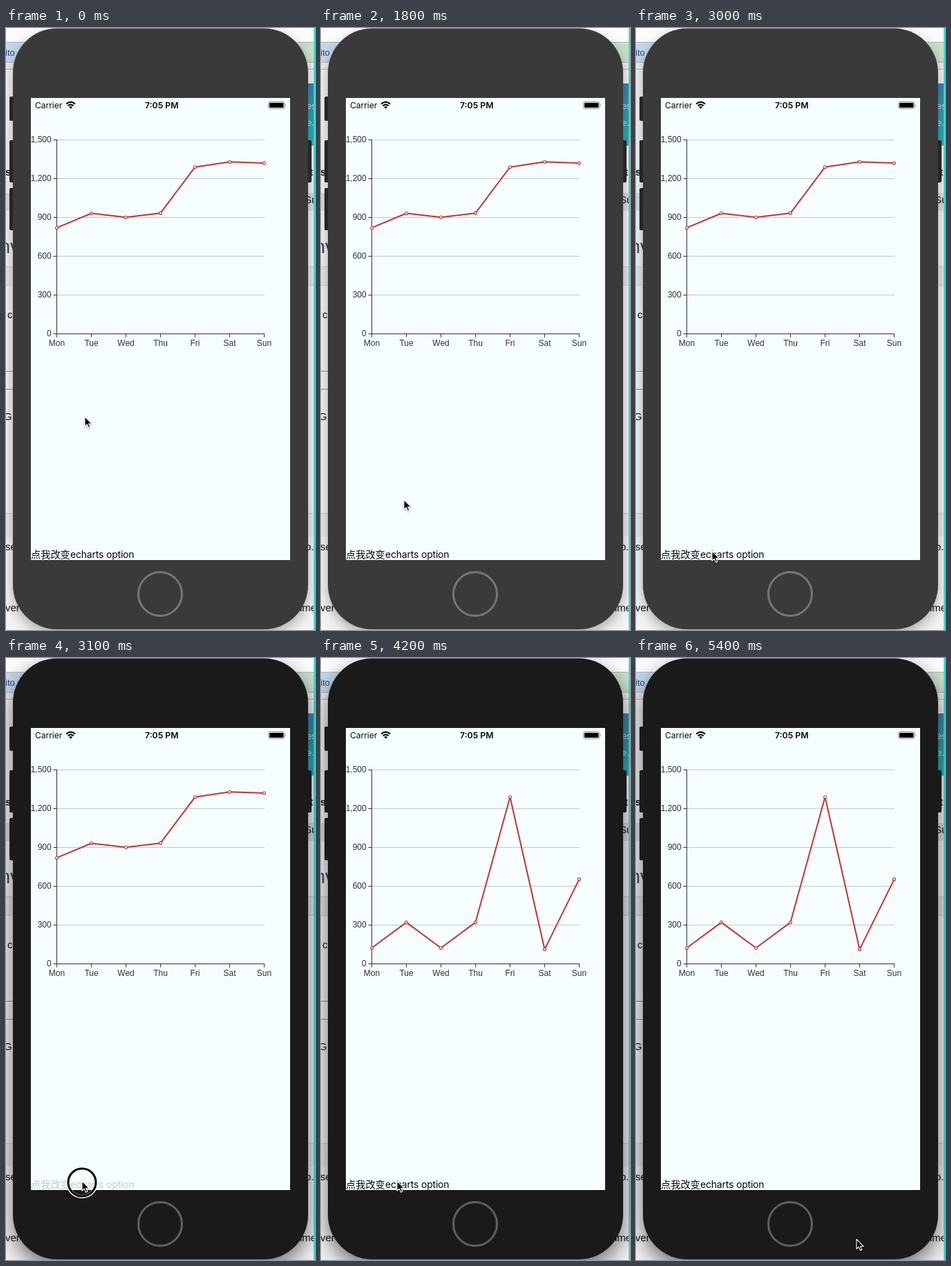
An HTML page for the animation above (5.5 s loop, 447 by 869 pixels).

```html
<!DOCTYPE html>
<html lang="zh">
<head>
<meta charset="utf-8">
<title>Chart option demo</title>
<style>
  html, body { margin: 0; width: 100%; height: 100%; overflow: hidden; background: #eee; }
  svg { display: block; width: 447px; height: 869px; }
  .page { font: 15px "Liberation Sans", Arial, sans-serif; fill: #111; }
  .ui { font: 12px Inter, "Open Sans", sans-serif; fill: #0a0a0a; }
  .axis { font: 12px "Liberation Sans", Arial, sans-serif; fill: #333; }
  #body { fill: #3a3a3a; filter: drop-shadow(0 7px 9px rgba(0, 0, 0, .3)); }
  #home { fill: none; stroke: #777; stroke-width: 3; }
  .keys { fill: #2c2c2c; }
  .focus #body { fill: #1a1a1a; filter: drop-shadow(0 12px 15px rgba(0, 0, 0, .55)); }
  .focus #home { stroke: #606060; }
  .focus .keys { fill: #242424; }
</style>
</head>
<body>
<svg id="stage" viewBox="0 0 447 869">
  <!-- desktop behind the phone -->
  <g class="page">
    <rect width="447" height="869" fill="#f3f3f3"/>
    <rect width="447" height="20" fill="#fcfcfc"/>
    <rect y="20" width="220" height="30" fill="#c3d8ee"/>
    <rect x="220" y="20" width="227" height="30" fill="#c9dfca"/>
    <rect y="50" width="447" height="10" fill="#ededed"/>
    <path d="M0 20.5H447M0 49.5H447M0 59.5H447" stroke="#b4b4b4"/>
    <rect y="238" width="447" height="26" fill="#dcdcdc"/>
    <rect y="344" width="447" height="28" fill="#e6e6e6"/>
    <rect y="700" width="447" height="34" fill="#e9e9e9"/>
    <path d="M0 344.5H447M0 371.5H447M0 700.5H447" stroke="#cfcfcf"/>
    <path d="M0 495.5H20M0 521.5H20" stroke="#8a8a8a"/>
    <linearGradient id="teal" x2="0" y2="1">
      <stop stop-color="#3a84ad"/><stop offset="1" stop-color="#28b3b5"/>
    </linearGradient>
    <rect x="400" y="80" width="47" height="90" fill="url(#teal)"/>
    <g fill="#c5e6ea" font-size="13">
      <text x="435" y="117">es</text><text x="435" y="141">e.</text>
    </g>
    <text x="-1" y="40" font-size="13" fill="#27477a">ito</text>
    <text x="-1" y="213" font-weight="bold">s</text>
    <text x="-9" y="325" font-size="27" fill="#3b4656">nv</text>
    <text x="2" y="419">c</text>
    <text x="-3" y="566">G</text>
    <text x="-1" y="754">se</text>
    <text x="-1" y="842">ver</text>
    <text x="440" y="213">t</text>
    <text x="432" y="253">Su</text>
    <text x="433" y="754">o.r</text>
    <text x="425" y="842">ime</text>
    <rect x="445" width="2" height="869" fill="#3fe0dc"/>
  </g>

  <!-- phone -->
  <g class="keys">
    <rect x="5" y="99" width="8" height="35" rx="2"/>
    <rect x="5" y="162" width="8" height="61" rx="2"/>
    <rect x="5" y="231" width="8" height="61" rx="2"/>
    <rect x="434" y="162" width="8" height="61" rx="2"/>
  </g>
  <rect id="body" x="10" y="0.5" width="427" height="867.5" rx="64"/>
  <circle id="home" cx="223" cy="817" r="31.5"/>
  <rect x="36" y="101" width="375" height="667" fill="#f5fdff"/>

  <!-- status bar -->
  <g class="ui">
    <text x="42" y="116">Carrier</text>
    <text x="225.3" y="116" font-size="12.3" font-weight="600" text-anchor="middle">7:05 PM</text>
    <g fill="none" stroke="#0a0a0a" stroke-width="2.1">
      <path d="M87.2 109.6Q93.6 104.2 100 109.6"/>
      <path d="M89.6 112.4Q93.6 108.9 97.6 112.4"/>
    </g>
    <path d="M91.2 114Q93.6 112 96 114L93.6 116.7Z"/>
    <rect x="379.5" y="106.5" width="23.5" height="10" rx="2.4" fill="none" stroke="#8d9193"/>
    <rect x="381" y="108" width="20.5" height="7" rx="1" fill="#000"/>
    <path d="M404 109.8Q405.8 111.5 404 113.2Z" fill="#8d9193"/>
  </g>

  <g id="axes" class="axis"></g>
  <path id="line" fill="none" stroke="#c23531" stroke-width="2" stroke-linejoin="bevel"/>
  <g id="dots" fill="#fff" stroke="#c23531" stroke-width="1.1"></g>

  <g id="label" class="ui" font-size="14">
    <text x="36" y="765" style="font: 14.2px 'Noto Sans CJK SC', 'Noto Sans CJK', sans-serif">点我改变</text>
    <text x="93" y="765" style="font-size: 14px; letter-spacing: -.2px">echarts option</text>
  </g>

  <g id="ring" fill="none">
    <circle cx="110" cy="757" r="20.5" stroke="#fff" stroke-width="5"/>
    <circle cx="110" cy="757" r="20" stroke="#000" stroke-width="3"/>
  </g>
  <path id="cursor" d="M0 0V14L3.2 11.1L5.6 16.3L7.9 15.3L5.6 10.2H10Z"
        fill="#000" stroke="#fff" stroke-width="1.1" stroke-linejoin="round"
        style="filter: drop-shadow(0 1px 1px rgba(0, 0, 0, .35))"/>
</svg>
<script>
const LOOP = 5500, STEP = 100;
const days = ['Mon', 'Tue', 'Wed', 'Thu', 'Fri', 'Sat', 'Sun'];
const before = [820, 932, 901, 934, 1290, 1330, 1320];
const after = [123, 321, 123, 321, 1290, 112, 654];
// time, x, y of the pointer tip
const track = [
  [0, 114, 561], [1300, 114, 561], [1400, 113, 565], [1500, 113, 583],
  [1600, 115, 614], [1700, 118, 650], [1800, 120, 681], [1900, 118, 729],
  [2100, 117, 746], [2200, 117, 746], [2500, 112, 753], [2800, 110, 755],
  [4900, 110, 755], [5000, 112, 757], [5100, 152, 776], [5200, 225, 809],
  [5300, 291, 834], [5400, 319, 839], [LOOP, 319, 839]
];

const $ = id => document.getElementById(id);
const clamp = v => Math.min(1, Math.max(0, v));
const px = i => 73.5 + 50 * i;
const py = v => 441.5 - v * 280 / 1500;

function add(parent, tag, attrs, text) {
  const el = document.createElementNS('http://www.w3.org/2000/svg', tag);
  for (const k in attrs) el.setAttribute(k, attrs[k]);
  if (text) el.textContent = text;
  return parent.appendChild(el);
}

const axes = $('axes');
let ticks = 'M73.5 161V442M73 441.5H374';
for (let v = 0; v <= 1500; v += 300) {
  const y = py(v);
  if (v) add(axes, 'path', { d: `M74 ${y}H374`, stroke: '#c3c9cb' });
  ticks += `M68.5 ${y}H73.5`;
  add(axes, 'text', { x: 65.7, y: y + 3.8, 'text-anchor': 'end' }, v.toLocaleString('en-US'));
}
days.forEach((day, i) => {
  ticks += `M${px(i)} 441.5V446.5`;
  add(axes, 'text', { x: px(i), y: 459, 'text-anchor': 'middle' }, day);
});
add(axes, 'path', { d: ticks, stroke: '#333', fill: 'none' });
const dots = days.map((d, i) => add($('dots'), 'circle', { cx: px(i), r: 2 }));

function pointer(t) {
  const n = track.findIndex(k => k[0] > t);
  const [t0, x0, y0] = track[n - 1], [t1, x1, y1] = track[n];
  const p = (t - t0) / (t1 - t0);
  return [x0 + (x1 - x0) * p, y0 + (y1 - y0) * p];
}

function labelOpacity(t) {
  if (t < 3100) return 1;
  const p = clamp((t - 3275) / 250);
  return 0.2 + 0.8 * p * p * (3 - 2 * p);
}

function draw(t) {
  const ease = 1 - (1 - clamp((t - 3291) / 300)) ** 3;
  const ys = before.map((v, i) => py(v + (after[i] - v) * ease));
  $('line').setAttribute('d', 'M' + ys.map((y, i) => px(i) + ' ' + y).join('L'));
  dots.forEach((dot, i) => dot.setAttribute('cy', ys[i]));
  $('stage').classList.toggle('focus', t >= 3100);
  $('label').setAttribute('opacity', labelOpacity(t));
  $('ring').setAttribute('visibility', t >= 3100 && t < 3300 ? 'visible' : 'hidden');
  $('cursor').setAttribute('transform', `translate(${pointer(t)})`);
}

const start = performance.now();
function tick() {
  const t = (performance.now() - start) % LOOP;
  draw(Math.floor(t / STEP) * STEP);
  requestAnimationFrame(tick);
}
tick();
</script>
</body>
</html>
```
